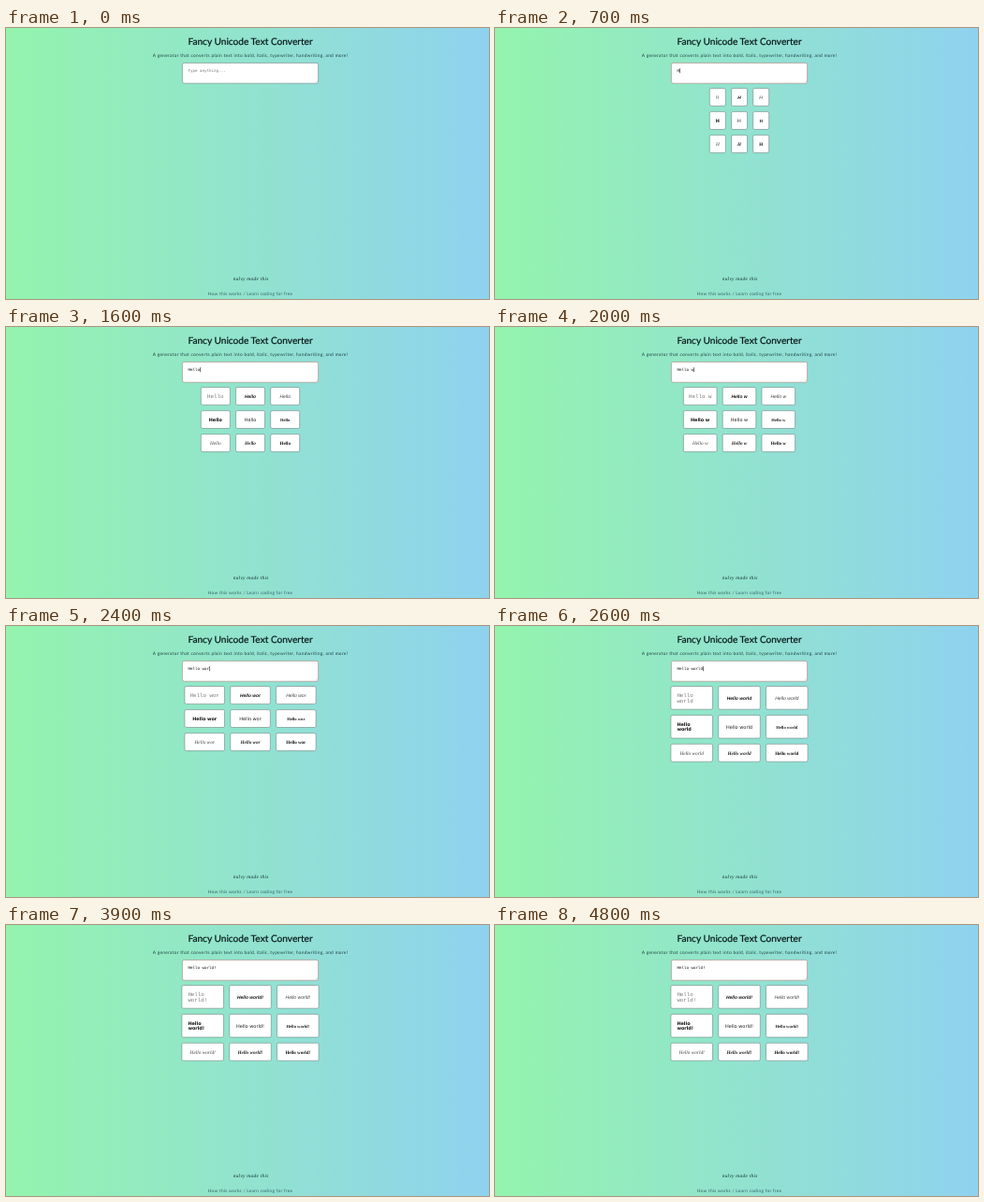
These frames come from a looping animation (516x290 px, 5 s). An HTML page:

```html
<!DOCTYPE html>
<html lang="en">
<head>
<meta charset="utf-8">
<title>Fancy Unicode Text Converter</title>
<style>
  html, body { margin: 0; width: 100%; height: 100%; overflow: hidden; }
  svg { display: block; width: 100vw; height: 100vh; }
  text { white-space: pre; text-rendering: geometricPrecision; }
  .ui { font-family: Lato, sans-serif; text-anchor: middle; }
  .small { font-size: 4.8px; }
  .title { font-size: 10.15px; fill: #08181a; stroke: #08181a; stroke-width: .22px; }
  .sign { font: italic 5.4px "Liberation Serif", serif; letter-spacing: .28px; text-anchor: middle; fill: #14302f; }
  .typed { font: 4.18px "DejaVu Sans Mono", monospace; }
  .box { fill: #fff; stroke: #6f8582; stroke-width: .6px; }
  .box.focus { stroke: #a8817a; }
</style>
</head>
<body>
<svg viewBox="0 0 516 290" preserveAspectRatio="none">
  <defs>
    <linearGradient id="bg">
      <stop offset="0" stop-color="#94f4ad"/>
      <stop offset="1" stop-color="#8fd2ef"/>
    </linearGradient>
  </defs>
  <rect width="516" height="290" fill="url(#bg)"/>
  <text class="ui title" x="261" y="18">Fancy Unicode Text Converter</text>
  <text class="ui small" x="261" y="30.8" fill="#1d3f40" letter-spacing=".3">A generator that converts plain text into bold, italic, typewriter, handwriting, and more!</text>
  <rect class="box" id="field" x="188.4" y="37.4" width="145.2" height="21.8" rx="2"/>
  <path d="M331 58.2l1.8-1.8" stroke="#888" stroke-width=".4"/>
  <text class="typed" id="input" x="194.6" y="47.2"></text>
  <rect id="caret" y="43.2" width=".6" height="5" fill="#111"/>
  <g id="cards"></g>
  <text class="sign" x="261.7" y="269.6">nulvy made this</text>
  <text class="ui small" x="261" y="285.8" fill="#365f64" letter-spacing=".25">How this works / Learn coding for free</text>
</svg>
<script>
const LOOP = 5000, FOCUS = 100, MESSAGE = "Hello world!";
const KEYS = [700, 900, 1300, 1400, 1600, 1800, 1900, 2100, 2200, 2500, 2600, 2900];
const CENTER = 261, TOP = 64.5, GAP = 6.2, ROW = 18.9, TALL = 24.7, MAX_WIDTH = 44.6;
const CHAR = 2.516;

const SANS = '"Liberation Sans", sans-serif';
const WIDE = '"DejaVu Sans", sans-serif';
const SERIF = '"Liberation Serif", serif';
const STYLES = [
  { font: '5.8px "Liberation Mono", monospace', fill: "#777" },
  { font: "italic bold 4.9px " + SANS, fill: "#111" },
  { font: "italic 5.1px " + SANS, fill: "#444" },
  { font: "bold 4.9px " + WIDE, fill: "#111" },
  { font: "5px " + WIDE, fill: "#222" },
  { font: "bold 4.6px " + SERIF, fill: "#222" },
  { font: "italic 5.3px " + SERIF, fill: "#444" },
  { font: "italic bold 5.2px " + SERIF, fill: "#222" },
  { font: "bold 5px " + SERIF, fill: "#111" }
];

const $ = id => document.getElementById(id);
const field = $("field"), input = $("input"), caret = $("caret"), grid = $("cards");

function add(tag, parent, attrs = {}) {
  const el = document.createElementNS("http://www.w3.org/2000/svg", tag);
  set(el, attrs);
  return parent.appendChild(el);
}

function set(el, attrs) {
  for (const key in attrs) el.setAttribute(key, attrs[key]);
}

const cards = STYLES.map(({ font, fill }) => {
  const box = add("rect", grid, { class: "box", rx: 1.6 });
  const lines = [0, 1].map(() => add("text", grid, { fill }));
  lines.forEach(line => line.style.font = font);
  return { box, lines };
});

function layout(text) {
  const shown = text.trimEnd(), n = shown.length;
  const natural = 13.5 + 3.5 * n - (n > 6 ? 2.4 : 0);
  const width = Math.min(MAX_WIDTH, natural);
  const wraps = natural > MAX_WIDTH;
  const left = CENTER - 1.5 * width - GAP;
  const tall = wraps ? TALL : ROW;

  cards.forEach(({ box, lines }, i) => {
    const col = i % 3, row = Math.floor(i / 3);
    const x = left + col * (width + GAP), y = TOP + row * (tall + GAP);
    const height = row < 2 ? tall : ROW;
    const split = wraps && col === 0 && row < 2;
    const words = split ? shown.split(" ") : [shown, ""];
    set(box, { x, y, width, height });
    lines.forEach((line, k) => {
      line.textContent = words[k];
      set(line, {
        x: split ? x + 6.5 : x + width / 2,
        y: y + height / 2 + 1.75 + (split ? (k - .5) * 5.9 : 0),
        "text-anchor": split ? "start" : "middle"
      });
    });
  });
}

let last = -1;

function draw(t) {
  const count = KEYS.filter(key => key <= t).length;
  if (count !== last) {
    last = count;
    const text = MESSAGE.slice(0, count);
    input.textContent = text || "Type anything...";
    set(input, { fill: count ? "#111" : "#777" });
    set(caret, { x: 194.6 + count * CHAR });
    grid.style.display = count ? "" : "none";
    if (count) layout(text);
  }
  const focused = t >= FOCUS;
  const blinkOff = t >= 3000 && Math.floor((t - 3000) / 600) % 2 === 1;
  field.classList.toggle("focus", focused);
  caret.style.display = focused && !blinkOff ? "" : "none";
}

const start = performance.now();
function tick() {
  draw((performance.now() - start) % LOOP);
  requestAnimationFrame(tick);
}
tick();
</script>
</body>
</html>
```
